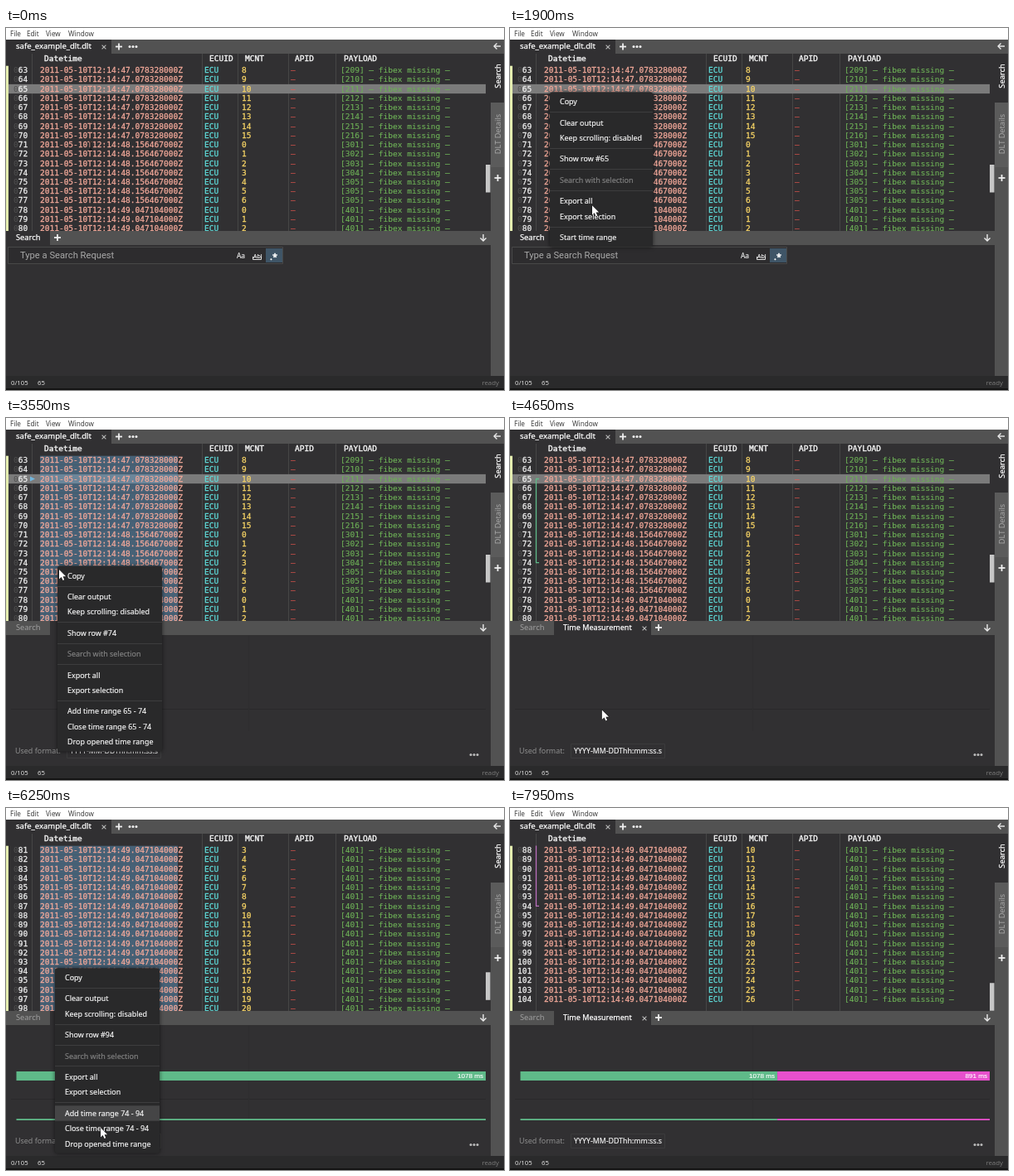
These frames come from a looping animation (600 by 437 pixels, 8000 ms). An HTML page with a canvas:

```html
<!DOCTYPE html>
<html lang="en">
<head>
<meta charset="utf-8">
<title>Time measurement</title>
<style>
  html, body { margin: 0; height: 100%; overflow: hidden; background: #313032; }
  canvas { display: block; }
</style>
</head>
<body>
<canvas id="stage" width="600" height="437"></canvas>
<script>
const ctx = document.getElementById('stage').getContext('2d');
const LOOP = 8000, ROW = 11.24, TOP = 45.4, BOTTOM = 245;
const BG = '#313032', BAR = '#525252', GREEN = '#5fba89', PINK = '#e750cc', BLUE = '#72b5dc';
const MONO = '"DejaVu Sans Mono", monospace';
const SANS = '"Noto Sans", sans-serif';
const ARIAL = '"Liberation Sans", Arial, sans-serif';

// [time, x, y]
const cursorPath = [
  [0, 102, 142], [150, 102, 142], [850, 48, 79], [1250, 48, 80], [1900, 99, 214],
  [2080, 101, 252], [2300, 101, 252], [3100, 62, 178], [3500, 62, 178], [3550, 64, 183],
  [3700, 64, 183], [4350, 111, 353], [4650, 111, 353], [4900, 67, 212], [5300, 67, 212],
  [5450, 59, 193], [5650, 59, 193], [6100, 112, 362], [6250, 114, 386], [6500, 114, 386],
  [7000, 68, 163], [LOOP, 68, 163]
];
const commonItems = row => [
  ['Copy'], ['Clear output', 'Keep scrolling: disabled'], ['Show row #' + row],
  ['Search with selection'], ['Export all', 'Export selection']
];
const rangeItems = (from, to) => [...commonItems(to),
  [`Add time range ${from} - ${to}`, `Close time range ${from} - ${to}`, 'Drop opened time range']];
const menus = [
  { from: 1200, to: 2200, x: 48, y: 89, w: 124, groups: [...commonItems(65), ['Start time range']] },
  { from: 3500, to: 4580, x: 62, y: 190.3, w: 126, groups: rangeItems(65, 74) },
  { from: 5600, to: 6500, x: 59, y: 204.7, w: 126, groups: rangeItems(74, 94) }
];
const openRanges = [{ from: 2300, to: 4580, row: 65 }, { from: 4850, to: 6500, row: 74 }];
const closedRanges = [
  { from: 4580, first: 65, last: 74, color: GREEN },
  { from: 6500, first: 74, last: 94, color: '#b96fbd' }
];

const active = (list, t) => list.find(e => t >= e.from && t < e.to);
const progress = (t, start, length) => Math.min(1, Math.max(0, (t - start) / length));
const easeOut = p => 1 - (1 - p) ** 4;
const lerp = (a, b, p) => a + (b - a) * p;

function rect(x, y, w, h, color) {
  ctx.fillStyle = color;
  ctx.fillRect(x, y, w, h);
}
// A thin outline (bolder) gives weights between regular and bold.
function text(s, x, y, color, size, { family = SANS, align = 'left', bolder = 0 } = {}) {
  ctx.font = `${size}px ${family}`;
  ctx.textAlign = align;
  ctx.fillStyle = ctx.strokeStyle = color;
  ctx.fillText(s, x, y);
  if (!bolder) return;
  ctx.lineWidth = bolder;
  ctx.lineJoin = 'round';
  ctx.strokeText(s, x, y);
}
function line(color, width, ...points) {
  ctx.strokeStyle = color;
  ctx.lineWidth = width;
  ctx.beginPath();
  points.forEach(([x, y]) => ctx.lineTo(x, y));
  ctx.stroke();
}
function frame(x, y, w, h, color) {
  ctx.strokeStyle = color;
  ctx.lineWidth = 1;
  ctx.strokeRect(x, y, w, h);
}
function plus(x, y) {
  rect(x - 4, y - 0.9, 8, 1.8, '#eee');
  rect(x - 0.9, y - 4, 1.8, 8, '#eee');
}
function cross(x, y) {
  line('#bbb', 1.1, [x - 2.4, y - 2.4], [x + 2.4, y + 2.4]);
  line('#bbb', 1.1, [x + 2.4, y - 2.4], [x - 2.4, y + 2.4]);
}
function dots(x, y, r, color) {
  ctx.fillStyle = color;
  for (const dx of [-4, 0, 4]) {
    ctx.beginPath();
    ctx.arc(x + dx, y, r, 0, 7);
    ctx.fill();
  }
}
function arrow(x, y, angle) {
  ctx.save();
  ctx.translate(x, y);
  ctx.rotate(angle);
  line('#eee', 1.4, [-4, 0], [4, 0]);
  line('#eee', 1.4, [0.5, -3.5], [4, 0], [0.5, 3.5]);
  ctx.restore();
}
function sideText(s, y, color, size, bolder) {
  ctx.save();
  ctx.translate(593, y);
  ctx.rotate(-Math.PI / 2);
  text(s, 0, 3.2, color, size, { align: 'center', bolder });
  ctx.restore();
}

function cursorAt(t) {
  const i = cursorPath.findIndex(k => k[0] > t);
  if (i < 1) return { x: cursorPath[0][1], y: cursorPath[0][2] };
  const [t0, x0, y0] = cursorPath[i - 1], [t1, x1, y1] = cursorPath[i];
  const p = (t - t0) / (t1 - t0);
  return { x: lerp(x0, x1, p), y: lerp(y0, y1, p) };
}
// The wheel moves the list three rows per tick.
function firstRow(t) {
  const down = Math.ceil(progress(t, 4930, 250) * 6) * 3;
  const end = Math.min(7, Math.ceil(progress(t, 7150, 400) * 3) * 3);
  return 63 + down + end;
}
function rowData(n) {
  if (n < 71) return ['47.078328000', n - 55, n + 146];
  if (n < 78) return ['48.156467000', n - 71, Math.min(n + 230, 305)];
  return ['49.047104000', n - 78, 401];
}

function drawTable(t, pointer, menu) {
  const top = firstRow(t), open = active(openRanges, t);
  const center = n => TOP + (n - top + 0.5) * ROW;
  const overTable = !menu && pointer.y > TOP && pointer.y < BOTTOM;
  const hovered = open && overTable ? top + Math.floor((pointer.y - TOP) / ROW) : -1;

  for (const x of [31.5, 236.5, 279.5, 340.5, 397.5]) line('#464646', 1, [x, 31], [x, BOTTOM]);
  [['Datetime', 46], ['ECUID', 245], ['MCNT', 288], ['APID', 348], ['PAYLOAD', 407]]
    .forEach(([s, x]) => text(s, x, 39.8, '#f4f4f4', 9.5, { family: MONO, bolder: 0.4 }));

  ctx.save();
  ctx.beginPath();
  ctx.rect(0, TOP, 584, BOTTOM - TOP);
  ctx.clip();
  for (let n = top; n <= Math.min(104, top + 17); n++) {
    const y = center(n), base = y + 3.1, [time, count, code] = rowData(n);
    const cell = (s, x, color, bolder = 0.3) =>
      text(s, x, base, color, 9.52, { family: MONO, bolder });
    if (n === 65) rect(0, y - ROW / 2, 578, ROW, '#7b7b7b');
    if (open) rect(41, y - ROW / 2, 166, ROW, n === hovered ? '#356a93' : 'rgba(95,145,185,.5)');
    if (n < 100) cell('0', 9, '#505050', 0);
    cell(n, n < 100 ? 14.7 : 9, '#eee');
    cell('2011-05-10T12:14:' + time, 41, n === hovered ? '#fff' : '#f2a899');
    cell('Z', 207.2, '#f2a899');
    cell('ECU', 239, '#5edbd9');
    cell(count, 284, '#f6d365');
    cell('–', 343, '#f0564f', 0);
    cell(`[${code}] – fibex missing –`, 403, '#6cae56', 0.15);
  }
  for (const r of closedRanges) {
    if (t < r.from) continue;
    const a = center(r.first), b = center(r.last);
    line(r.color, 1.3, [35, a], [31.5, a], [31.5, b], [35, b]);
  }
  if (open) {
    const y = center(open.row);
    if (hovered > 0) line(BLUE, 1.3, [31.5, y], [31.5, center(hovered)], [35, center(hovered)]);
    ctx.fillStyle = BLUE;
    ctx.beginPath();
    ctx.moveTo(29, y - 3);
    ctx.lineTo(35, y);
    ctx.lineTo(29, y + 3);
    ctx.fill();
  }
  rect(0, TOP, 3, BOTTOM - TOP, '#e4edb0');
  rect(578, 165 + (top - 63) * 1.85, 5.5, 33.5, '#c6c6c6');
  ctx.restore();
}

function drawSearchPanel() {
  rect(0, 245, 53, 17, BG);
  text('Search', 12, 256, '#fff', 9.3, { bolder: 0.25 });
  plus(62, 253);
  rect(3, 265, 330, 19, '#2d2c2e');
  frame(2.5, 264.5, 331, 20, '#484848');
  text('Type a Search Request', 17, 277.5, '#a8a8a8', 11.2, { family: 'Roboto, sans-serif' });
  text('Aa', 278, 278, '#e4e4e4', 8.4, { bolder: 0.2 });
  line('#ddd', 1, [297.5, 276], [297.5, 279.5], [307.5, 279.5], [307.5, 276]);
  text('Abl', 298, 278, '#eee', 7, { bolder: 0.2 });
  rect(313, 266, 20, 17, '#3f5567');
  text('.*', 318, 280, '#fff', 11, { bolder: 0.6 });
}

function drawBar(x0, x1, color, label) {
  if (x1 - x0 < 1) return;
  rect(x0, 318, x1 - x0, 11, color);
  rect(x0, 375.2, x1 - x0, 1.8, color);
  if (x1 - x0 > 34) text(label, x1 - 3, 326.3, '#fff', 8.1, { family: ARIAL, align: 'right', bolder: 0.15 });
}
function drawTimePanel(t) {
  rect(53, 245, 117, 17, BG);
  text('Search', 12, 256, '#a0a0a0', 9.3);
  text('Time Measurement', 64, 256, '#fff', 9.05, { bolder: 0.25 });
  cross(162, 254);
  plus(179, 253);

  line('#29292a', 1, [6, 351.5], [578, 351.5]);
  line('#2e2d2f', 1, [292.5, 263], [292.5, 378]);

  const full = lerp(12.5, 578, easeOut(progress(t, 4700, 500)));
  const split = lerp(full, 12.5 + 565.5 * 1078 / 1969, easeOut(progress(t, 6600, 500)));
  drawBar(12.5, split, GREEN, '1078 ms');
  drawBar(split, full, PINK, '891 ms');

  text('Used format:', 11, 405.3, '#8f8f8f', 8.95);
  frame(73.5, 393.5, 113, 17, '#3b3b3c');
  text('YYYY-MM-DDThh:mm:ss.s', 77, 405.3, '#eee', 8.8, { bolder: 0.2 });
  dots(564, 406.5, 1.5, '#bbb');
}

function drawFrame() {
  rect(0, 0, 600, 437, BG);
  rect(0, 0, 600, 14, '#fff');
  [['File', 5], ['Edit', 25], ['View', 48], ['Window', 75]]
    .forEach(([s, x]) => text(s, x, 9.8, '#333', 8.2, { family: '"Open Sans", sans-serif' }));

  rect(0, 14, 600, 17, BAR);
  rect(0, 14, 127, 17, BG);
  text('safe_example_dlt.dlt', 12, 24.8, '#fff', 9.5, { bolder: 0.25 });
  cross(118, 23);
  plus(136, 22.5);
  dots(153, 22.5, 1.5, '#eee');

  rect(584, 14, 16, 406, BAR);
  rect(584, 31, 16, 59, BG);
  rect(584, 90, 16, 78, '#5b5b5b');
  arrow(592, 22, Math.PI);
  sideText('Search', 58, '#fff', 9.3, 0.25);
  sideText('DLT Details', 128, '#a8a8a8', 9.2, 0);
  plus(592.5, 181);

  rect(0, 245, 584, 17, BAR);
  arrow(575, 253, Math.PI / 2);
  rect(0, 420, 600, 17, '#2a2a2b');
  rect(0, 435, 600, 2, '#141414');
  text('0/105', 6, 431.3, '#ddd', 7.8);
  text('65', 38, 431.3, '#ddd', 7.8);
  text('ready', 594, 431.3, '#777', 7.8, { align: 'right' });
}

function drawMenu(menu, pointer) {
  const count = menu.groups.flat().length;
  const height = (count - 1) * 18.4 + (menu.groups.length - 1) * 7 + 23;
  ctx.save();
  ctx.shadowColor = 'rgba(0,0,0,.6)';
  ctx.shadowBlur = 5;
  ctx.fillStyle = '#29292a';
  ctx.beginPath();
  ctx.roundRect(menu.x, menu.y - 11.5, menu.w, height, 3);
  ctx.fill();
  ctx.restore();

  let y = menu.y;
  menu.groups.forEach((group, i) => {
    if (i) rect(menu.x, Math.round(y - 13.2), menu.w, 1, '#3d3d3e');
    for (const label of group) {
      const disabled = label === 'Search with selection';
      if (!disabled && Math.abs(pointer.y - y) < 9.2 && pointer.y > menu.y + 10)
        rect(menu.x, y - 9.2, menu.w, 18.4, '#454546');
      text(label, menu.x + 12, y + 3.2, disabled ? '#808080' : '#f2f2f2', 8.95, { bolder: 0.2 });
      y += 18.4;
    }
    y += 7;
  });
}

function drawPointer({ x, y }, beam) {
  if (beam) {
    line('#111', 1, [x, y - 5], [x, y + 5]);
    line('#111', 1, [x - 2, y - 5], [x + 2, y - 5]);
    line('#111', 1, [x - 2, y + 5], [x + 2, y + 5]);
    return;
  }
  ctx.save();
  ctx.translate(x, y);
  ctx.beginPath();
  [[0, 0], [0, 11.5], [2.7, 9], [4.5, 13], [6.3, 12.2], [4.6, 8.3], [8.2, 8.2]]
    .forEach(([px, py]) => ctx.lineTo(px, py));
  ctx.closePath();
  ctx.strokeStyle = '#111';
  ctx.lineWidth = 1;
  ctx.stroke();
  ctx.fillStyle = '#fff';
  ctx.fill();
  ctx.restore();
}

function draw(t) {
  const pointer = cursorAt(t), menu = active(menus, t);
  drawFrame();
  drawTable(t, pointer, menu);
  if (t < 2300) drawSearchPanel();
  else drawTimePanel(t);
  // Menu highlighting trails the pointer slightly.
  if (menu) drawMenu(menu, cursorAt(t - 90));
  const overText = pointer.y > TOP && pointer.y < BOTTOM;
  drawPointer(pointer, overText && !menu && !active(openRanges, t));
}

function tick() {
  draw(performance.now() % LOOP);
  requestAnimationFrame(tick);
}
tick();
</script>
</body>
</html>
```
